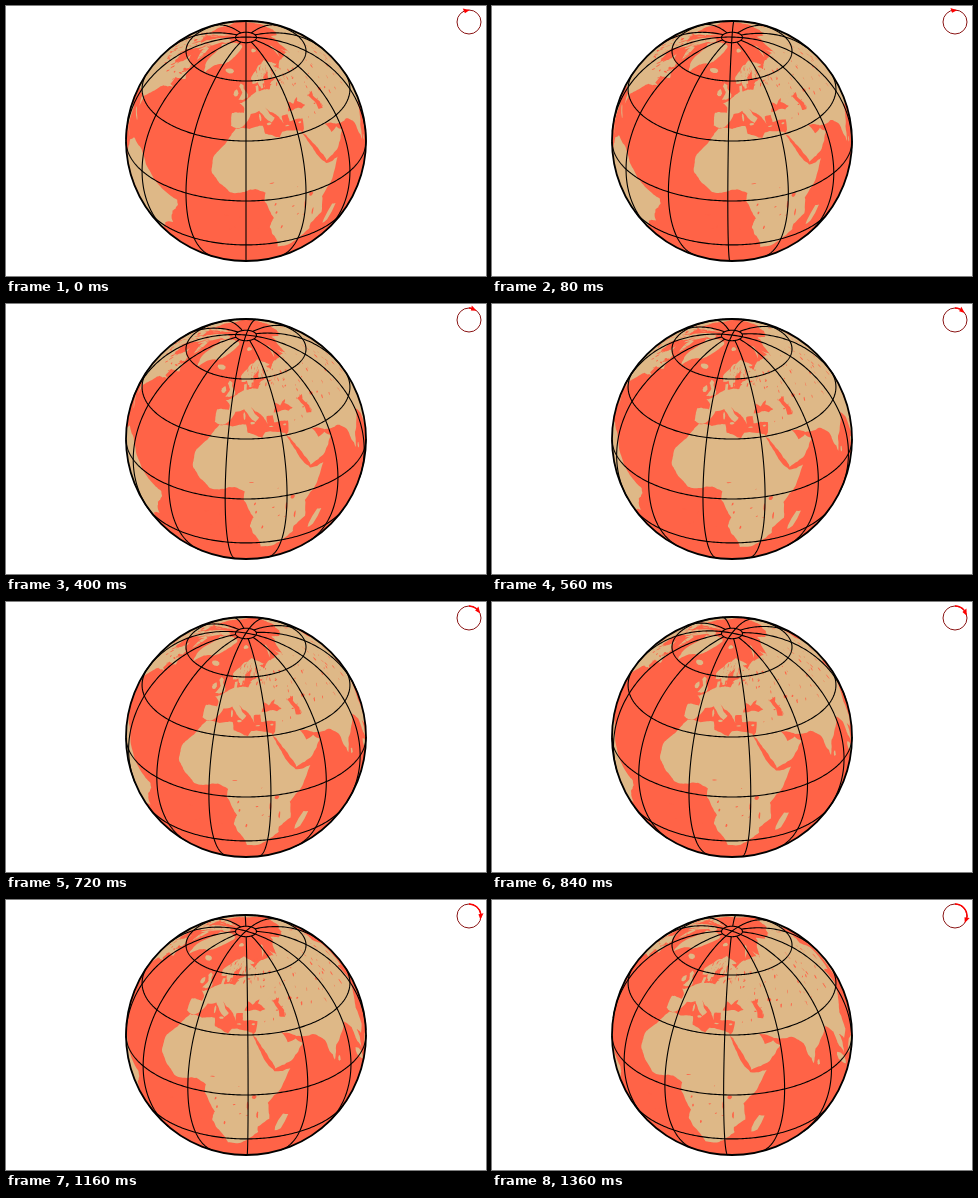
Write an HTML page with a canvas that moves like this. It is 480 by 270 pixels and loops after 1.4 s.

```html
<!DOCTYPE html>
<html lang="en">
<head>
<meta charset="utf-8">
<title>Turning globe</title>
<style>
html, body { margin: 0; width: 100%; height: 100%; overflow: hidden; background: #fff; }
canvas { display: block; }
</style>
</head>
<body>
<canvas id="stage" width="480" height="270"></canvas>
<script>
const ctx = document.getElementById('stage').getContext('2d');
const SEA = '#ff6347', LAND = '#deb887';
const CX = 240, CY = 135, R = 120;
const RAD = Math.PI / 180, TURN = 2 * Math.PI, TILT = 30 * RAD;
const STEP = 40, STEPS = 35;

let seed = 7;
function random(low = 0, high = 1) {
  seed = (seed * 16807) % 2147483647;
  return low + (high - low) * seed / 2147483647;
}

// Splits a coast at displaced midpoints until it looks natural.
function roughen([ax, ay], [bx, by]) {
  const dx = bx - ax, dy = by - ay, length = Math.hypot(dx, dy);
  if (length < 1.5) return [[ax, ay]];
  const shift = random(-.08, .08) * Math.min(1, 8 / length);
  const mid = [(ax + bx) / 2 - dy * shift, (ay + by) / 2 + dx * shift];
  return [...roughen([ax, ay], mid), ...roughen(mid, [bx, by])];
}

// Key points are longitude, latitude.
function coast(...keys) {
  const points = [];
  for (let i = 0; i < keys.length; i += 2) points.push([keys[i], keys[i + 1]]);
  return points.flatMap((p, i) => roughen(p, points[(i + 1) % points.length]));
}

function blob(lon, lat, rx, ry, tilt = 0) {
  const c = Math.cos(tilt * RAD), s = Math.sin(tilt * RAD), points = [];
  for (let a = 0; a < TURN; a += TURN / 9) {
    const k = random(.8, 1.2), x = k * rx * Math.cos(a), y = k * ry * Math.sin(a);
    points.push([lon + x * c - y * s, lat + x * s + y * c]);
  }
  return points;
}

function scatter(count, west, east, south, north, size) {
  return Array.from({ length: count }, () => {
    const lon = random(west, east), lat = random(south, north);
    const rx = size * random(.4, 1.4);
    return blob(lon, lat, rx, rx * random(.15, .5), random(0, 90));
  });
}

const africa = coast(-6,35.8, 10,37, 11,33, 19,30.3, 21,32.8, 32.5,31, 37,20.5, 43,11.6, 51.2,11.8,
  46,2.3, 39.5,-5, 40.6,-15, 35,-20, 35.4,-24, 32.7,-27.5, 26,-34, 18.5,-34.2, 12,-17, 13.7,-11, 9,-.8,
  9.4,4, 4.4,6.3, -7.6,4.4, -13,8.8, -17,13.5, -17,21, -9.8,30.5);
const europe = coast(-5.6,36, -9,37, -9.2,43.2, -1.5,43.5, -1.2,46, -4.7,48.3, 1.6,50.9, 8.3,54, 8.3,57,
  10.5,57.5, 10.5,54.2, 20,54.5, 22,57.5, 29,59.8, 22,60.3, 25,65.3, 17.3,61.5, 16.2,56.2, 13,55.5,
  10.8,59.2, 6,58.3, 5,61.5, 14.5,67.7, 26,71, 41,66.8, 34,66.3, 38,64, 45,67, 62,69, 62,40, 27,40.5,
  23,40.3, 23,36.6, 19.5,41.5, 13.2,45.6, 18.2,40.2, 15.8,38, 8.8,44.4, 3.1,43, 0,38.7, -2.2,36.8);
const asia = coast(60,69, 68,68.5, 68,72.5, 73,68.5, 81,73.6, 104,77.7, 113,73.7, 140,72.5, 180,68.8,
  180,63, 162,55, 160,61, 136,54.7, 140,48, 128,37, 122,40, 122,31, 108,21.5, 109,12, 105,9, 100.5,13.4,
  103.5,1.5, 98.3,8.5, 96,17, 91,22.5, 80.2,15, 77.5,8.2, 72.8,20.5, 67,25, 57,26.5, 49,30, 51.5,24.5,
  56.3,25.5, 59.8,22.5, 53,16, 43.5,12.8, 39,21.5, 34.7,28.5, 32.5,30, 34.5,31.5, 35.8,36.5, 27,37,
  27,41, 40,45, 52,50);
const northAmerica = coast(-168,66, -156,71.3, -128,70, -96,68, -82,69, -94,60, -82,53, -77,57, -78,62,
  -70,59.5, -65,60, -56,52.5, -66,50, -65,46, -61,45.8, -70,43, -76,36, -81,31, -80,25.5, -84,30, -97,27,
  -95,18.5, -88,21, -84,10, -77,8.5, -105,20, -124,40, -130,54, -150,60.5);
const southAmerica = coast(-77,8.5, -72,12, -62,10.5, -50,0, -35.2,-5.5, -35,-8.5, -39,-13.5, -41,-22,
  -48.5,-26, -57,-37, -68,-52, -73,-38, -70.5,-18, -81,-5);
const greenland = coast(-44,60, -53,66.5, -58,75.3, -71,77.5, -60,82, -33,83.6, -12,81.5, -20,74, -25,70,
  -40,65.5);
const britain = coast(-5.6,50, 1.4,51.2, 1.5,52.8, -2,56, -2,57.6, -5,58.6, -6,56.8, -3,54);
const blackSea = coast(28,41.6, 30.5,46.3, 33.5,44.5, 38.5,47, 37,45.2, 41.5,42, 38,41, 34.5,42);
const caspian = coast(47.5,45.5, 52.5,46.5, 51,44.3, 53.5,40, 53,36.8, 49.5,37.5, 50,40.3);

const iceland = blob(-19, 65, 4.7, 1.5);
const ireland = blob(-8, 53.3, 1.7, 1.9);
const sardinia = blob(9, 41, .6, 1.9);
const sicily = blob(14, 37.5, 1.4, .6);
const crete = blob(25, 35.2, 1.3, .3);
const cyprus = blob(33.3, 35.1, 1, .4);
const madagascar = blob(46.8, -18.8, 6.8, 2, 70);
const ceylon = blob(80.8, 7.8, .8, 1.5);
const sumatra = blob(101, 0, 7.5, 1.6, -46);
const borneo = blob(114, 1, 4, 4);
const japan = blob(138, 37, 9, 1.4, 48);
const svalbard = blob(18, 78.5, 6, 1.3);
const novayaZemlya = blob(59, 73.8, 8, 1, 30);
const baffin = blob(-73, 68.8, 11, 2.2, -25);
const ellesmere = blob(-78, 80, 13, 2.3, 5);
const cuba = blob(-79.5, 21.8, 5, .6, -18);

const lands = [africa, europe, asia, northAmerica, southAmerica, greenland, britain, iceland, ireland,
  sardinia, sicily, crete, cyprus, madagascar, ceylon, sumatra, borneo, japan, svalbard, novayaZemlya,
  baffin, ellesmere, cuba, ...scatter(26, -122, -78, 69, 78, 5)];

const victoria = blob(32.9, -1.1, 1.1, 1.1);
const aral = blob(60, 45, 1.5, 1);
const riftLakes = [blob(29.8, -6, .4, 2.5), blob(34.5, -12, .4, 2.2)];
const waters = [blackSea, caspian, victoria, aral, ...riftLakes,
  ...scatter(130, -125, -58, 48, 74, 1.6),
  ...scatter(45, 12, 40, 56, 68, 1),
  ...scatter(80, 40, 150, 35, 72, 1),
  ...scatter(16, -15, 36, -20, 16, .8)];

function project(lon, lat, center) {
  const a = (lon - center) * RAD, b = lat * RAD;
  const x = Math.cos(b) * Math.sin(a), c = Math.cos(b) * Math.cos(a), s = Math.sin(b);
  return {
    x, y: Math.cos(TILT) * s - Math.sin(TILT) * c,
    depth: Math.sin(TILT) * s + Math.cos(TILT) * c
  };
}

// Points behind the globe slide out to its rim.
function fillArea(points, color, center) {
  let visible = false;
  ctx.beginPath();
  for (const [lon, lat] of points) {
    const p = project(lon, lat, center);
    if (p.depth > 0) visible = true;
    const k = p.depth < 0 ? R / Math.hypot(p.x, p.y) : R;
    ctx.lineTo(CX + p.x * k, CY - p.y * k);
  }
  if (!visible) return;
  ctx.fillStyle = color;
  ctx.fill();
}

function strokeCurve(pointAt, from, to, center) {
  let pen = false;
  ctx.beginPath();
  for (let v = from; v <= to; v++) {
    const p = project(...pointAt(v), center);
    const x = CX + p.x * R, y = CY - p.y * R;
    if (p.depth < 0) pen = false;
    else if (pen) ctx.lineTo(x, y);
    else { ctx.moveTo(x, y); pen = true; }
  }
  ctx.stroke();
}

function circle(x, y, r) {
  ctx.beginPath();
  ctx.arc(x, y, r, 0, TURN);
}

function drawGlobe(center) {
  circle(CX, CY, R);
  ctx.fillStyle = SEA;
  ctx.fill();
  for (const area of lands) fillArea(area, LAND, center);
  for (const area of waters) fillArea(area, SEA, center);

  ctx.strokeStyle = '#000';
  ctx.lineWidth = 1.1;
  for (let lon = 0; lon < 360; lon += 30) {
    const end = lon % 90 ? 85 : 90;
    strokeCurve(lat => [lon, lat], -end, end, center);
  }
  for (const lat of [-30, 0, 30, 60, 85]) strokeCurve(lon => [lon, lat], 0, 360, center);
  ctx.lineWidth = 1.8;
  circle(CX, CY, R);
  ctx.stroke();
}

function drawDial(turn) {
  const x = 463, y = 16, r = 12, top = -TURN / 4;
  const tip = top + turn * TURN, base = tip - .5;
  const corner = (a, d) => ctx.lineTo(x + d * Math.cos(a), y + d * Math.sin(a));
  ctx.lineWidth = 1;
  ctx.strokeStyle = '#8a1414';
  circle(x, y, r);
  ctx.stroke();
  ctx.strokeStyle = ctx.fillStyle = '#f00';
  ctx.lineWidth = 1.5;
  ctx.beginPath();
  ctx.arc(x, y, r, top, Math.max(top, base));
  ctx.stroke();
  ctx.beginPath();
  corner(tip, r);
  corner(base, r + 2.8);
  corner(base, r - 2.4);
  ctx.fill();
}

function draw() {
  const step = Math.floor(performance.now() / STEP) % STEPS;
  ctx.fillStyle = '#fff';
  ctx.fillRect(0, 0, 480, 270);
  drawGlobe(step);
  drawDial((step + 1) / 100);
  requestAnimationFrame(draw);
}
draw();
</script>
</body>
</html>
```
